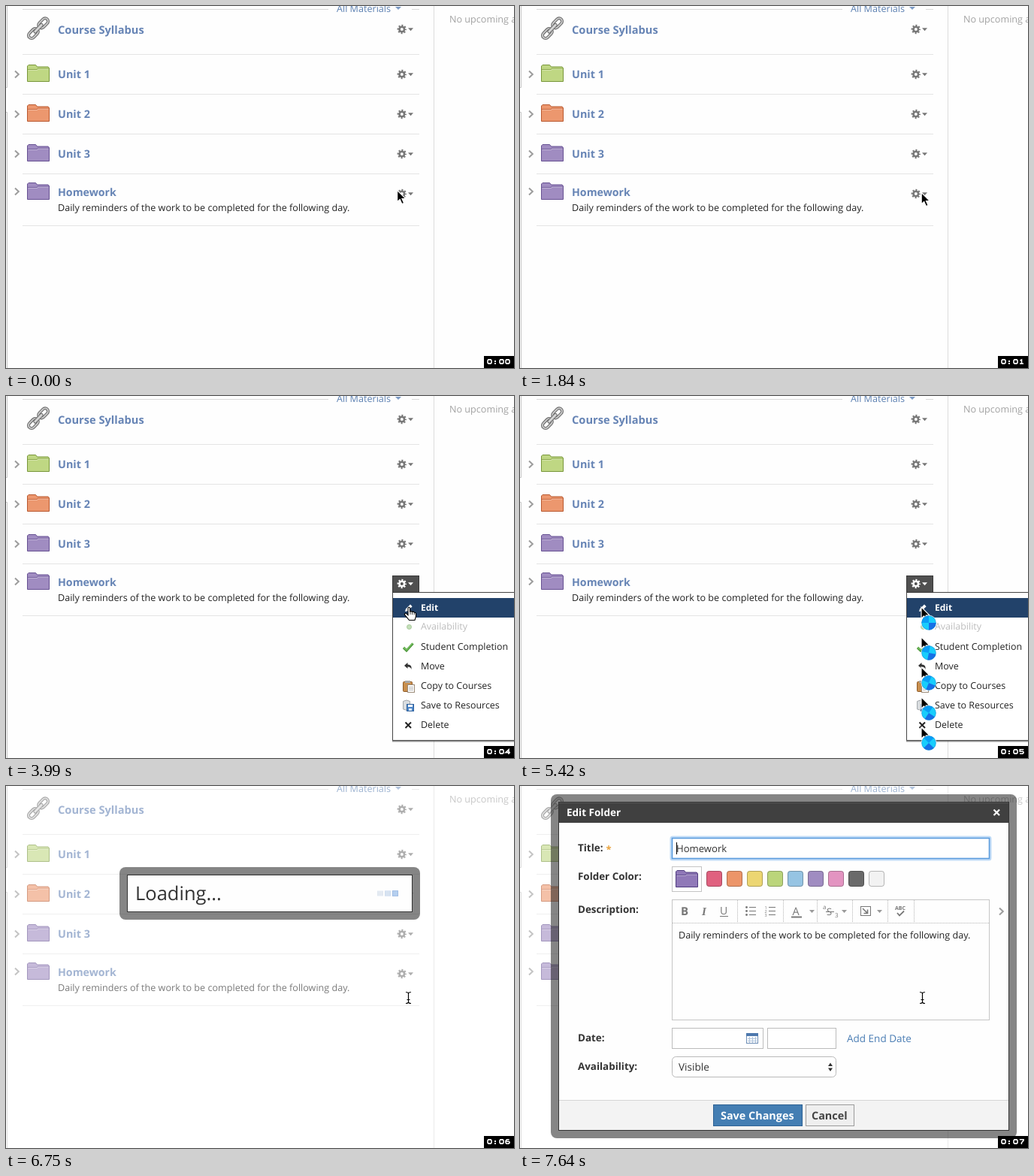
These frames come from a looping animation (676x482 px, 8 s). An HTML page:

```html
<!DOCTYPE html>
<html lang="en">
<head>
<meta charset="utf-8">
<title>Edit folder</title>
<style>
html, body { margin: 0; width: 100%; height: 100%; overflow: hidden; background: #fefefe; }
svg { display: block; }
text { font-family: "Open Sans", "Noto Sans", sans-serif; text-rendering: geometricPrecision; white-space: pre; }
</style>
</head>
<body>
<svg id="stage" width="676" height="482" viewBox="0 0 676 482"></svg>
<script>
const LOOP = 8000;
const range = n => [...Array(n).keys()];

// ---------- shape helpers ----------
const text = (x, y, s, size = 12.6, fill = '#222', extra = '') =>
  `<text x="${x}" y="${y}" font-size="${size}" fill="${fill}" ${extra}>${s}</text>`;
const bold = (x, y, s, size, fill) => text(x, y, s, size, fill, 'font-weight="700"');
const rect = (x, y, w, h, fill, extra = '') =>
  `<rect x="${x}" y="${y}" width="${w}" height="${h}" fill="${fill}" ${extra}/>`;
const box = (x, y, w, h, fill, stroke, rx = 0) =>
  rect(x + .5, y + .5, w - 1, h - 1, fill, `stroke="${stroke}" rx="${rx}"`);
const path = (d, fill, extra = '') => `<path d="${d}" fill="${fill}" ${extra}/>`;
const line = (d, stroke, width = 1, extra = '') =>
  path(d, 'none', `stroke="${stroke}" stroke-width="${width}" ${extra}`);
const group = (s, extra = '') => `<g ${extra}>${s}</g>`;
const at = (x, y, s, extra = '') => group(s, `transform="translate(${x} ${y})" ${extra}`);

const caret = (x, y, fill, w = 7) => path(`M${x} ${y}h${w}l${-w / 2} 4z`, fill);
const chevron = (x, y) => line(`M${x} ${y - 4.5}l4.8 4.5l-4.8 4.5`, '#9c9c9c', 2);
const gear = (y, c = '#777') => at(526.8, y,
  `<circle r="3.3" fill="none" stroke="${c}" stroke-width="2.6"/>` +
  `<circle r="5.1" fill="none" stroke="${c}" stroke-width="2.2" stroke-dasharray="2 2.005" stroke-dashoffset="1"/>`) +
  caret(535, y - 1.8, c);
const folder = (x, y, fill, edge) => at(x, y,
  path('M.5 22.5V2L2 .5H11.5L13.5 3H28L29.5 4.5V22.5Z', fill, `stroke="${edge}"`) +
  line('M1 6.5H13L14.5 5.2H29', edge, 1, 'opacity=".7"') +
  line('M1.5 7.5H13.5L15 6.2H28.5', '#fff', 1, 'opacity=".35"'));

const GREEN = ['#bfd783', '#78963a'], ORANGE = ['#ec976e', '#b9582f'], PURPLE = ['#a08cc1', '#665192'];
const LINK = '#6684b5';

// ---------- course page ----------
const chain = at(43, 29.7, group(
  [-9.5, 9.5].map(x =>
    rect(x - 7.5, -4, 15, 8, 'none', 'rx="4" stroke="#6f6f6f" stroke-width="4"') +
    rect(x - 7.5, -4, 15, 8, 'none', 'rx="4" stroke="#cfcfcf" stroke-width="1.7"')).join('') +
  rect(-8, -2, 16, 4, '#d4d4d4', 'rx="2" stroke="#666"'), 'transform="rotate(-46)"'));

const page =
  rect(0, 0, 676, 482, '#fefefe') +
  line('M0 108.5H1.5V0M0 141.5H1.5V482', '#c6c6c6') +
  line('M569.5 0V482', '#dcdcdc') +
  line('M22 4.5H429M540 4.5H550', '#d9d9d9') +
  line([64, 117, 170, 223, 292].map(y => `M22 ${y}.5H550`).join(''), '#e4e4e4') +
  text(440, 8, 'All Materials', 12.6, '#5c80b2') + caret(518, 1, '#7c9bc6', 8) +
  text(590, 22, 'No upcoming a', 12.6, '#a3a3a3') +
  chain + bold(69, 37, 'Course Syllabus', 14.65, LINK) +
  [['Unit 1', 91, GREEN], ['Unit 2', 144, ORANGE], ['Unit 3', 197, PURPLE]].map(([s, y, c]) =>
    chevron(12, y) + folder(28, y - 13, ...c) + bold(69, y + 5, s, 14.4, LINK)).join('') +
  chevron(12, 247) + folder(28, 235, ...PURPLE) + bold(69, 253, 'Homework', 14.2, LINK) +
  text(69, 273, 'Daily reminders of the work to be completed for the following day.') +
  [31, 91, 144, 197, 250].map(y => gear(y)).join('');

// ---------- gear menu ----------
const hover = box(514, 239, 36, 23, '#f3f3f3', '#bdbdbd') + gear(250, '#666');

const pencil = c => path('M531 287l1-3.4 6-6 2.6 2.6-6 6z', c);
const disk = at(528, 404,
  path('M.5 2.5Q5 -.5 9.5 2.5V13Q5 15.5 .5 13Z', '#d9dde0', 'stroke="#a4a9ad"') +
  box(5, 6, 10, 10, '#4c86c8', '#2f619c') + rect(7, 7, 6, 3, '#fff') + rect(8, 12, 4, 3, '#dbe8f6'));
const clipboard = at(528, 379,
  box(0, 1, 13, 14, '#c98f4e', '#8e5a26', 1) + rect(3, 0, 7, 3, '#a9a9a9') +
  box(6, 5, 10, 11, '#fff', '#9a8a78') + line('M8 8.5H14M8 10.5H14M8 12.5H14', '#b9b9b9'));
const items = [['Edit', 286], ['Availability', 311, '#bdbdbd'], ['Student Completion', 338],
  ['Move', 364], ['Copy to Courses', 390], ['Save to Resources', 416], ['Delete', 442]];

const menu =
  rect(514, 459, 162, 2, '#000', 'opacity=".22"') +
  rect(514.5, 261.5, 170, 197, '#fff', 'stroke="#444"') + rect(514, 458, 162, 1.5, '#555') +
  box(514, 239, 36, 23, '#505050', '#383838') + gear(250, '#fff') +
  items.map(([s, y, c]) => text(552, y, s, 12.45, c)).join('') + pencil('#222') +
  '<circle cx="536.5" cy="307.5" r="3" fill="#c3dfb8" stroke="#a8c99c"/>' +
  line('M529 335l4 4 8.5-9.5', '#4f9a3d', 3.2) + line('M529.5 335l3.6 3.2 8-9', '#7cc565', 1.2) +
  path('M530 359l4.5-4v2.6q6 0 5 6.6q-1-3.6-5-3.6v2.4z', '#333') +
  clipboard + disk + line('M531.5 434.5l7.5 7.5M539 434.5l-7.5 7.5', '#222', 2);
const editRow = rect(515, 269, 161, 26, '#22426a') + bold(552, 286, 'Edit', 12, '#fff') + pencil('#fff');

// ---------- loading box ----------
const frame = (x, y, w, h) =>
  rect(x, y, w, h, '#000', 'rx="8" opacity=".48"') + box(x + 10, y + 10, w - 20, h - 20, '#fefefe', '#333');
const loading = frame(151, 108, 400, 70) + text(172, 152, 'Loading...', 25.5, '#333') +
  range(3).map(i => rect(494 + 10 * i, 140, 8, 6, '#eceff3') +
    box(494 + 10 * i, 139, 8, 8, '#93bbee', '#6f9cda').replace('<rect', `<rect id="cell${i}"`)).join('');

// ---------- edit dialog ----------
const label = (y, s) => bold(77, y, s, 13.4, '#333');
const swatches = ['#e0617f', '#ec9569', '#ecd672', '#bbd57b', '#96c4e3', '#a08cc1', '#e394c1', '#6a6a6a', '#f2f2f2'];
const INK = '#777';
const tools =
  bold(214, 172, 'B', 15, INK) +
  text(242, 172, 'I', 15, INK, 'font-style="italic" style="font-family:\'Liberation Serif\',serif" font-weight="700"') +
  text(266, 171, 'U', 14, INK) + line('M266 173.5H277', INK) +
  line('M305 161.5H314M305 166.5H314M305 171.5H314', INK) +
  [161.5, 166.5, 171.5].map((y, i) => `<circle cx="301.5" cy="${y}" r="1.4" fill="${INK}"/>` +
    text(325.5, y + 2, i + 1, 5.5, INK)).join('') +
  line('M331 161.5H340M331 166.5H340M331 171.5H340', INK) +
  text(362.5, 172, 'A', 14.5, INK) + line('M361 174.5H375', INK, 2) +
  text(403, 164, 'a', 8, INK) + text(408, 172, 'S', 13, INK) + line('M407 167.5H418', INK) + text(419, 175, '3', 8, INK) +
  box(453, 160, 14, 13, 'none', INK) + line('M456 163l6 6M462.5 164.5V169.5H457.5', INK, 1.6) +
  [385, 428, 475].map(x => caret(x, 165, '#999')).join('') +
  bold(499, 165, 'ABC', 7, INK) + line('M502 169l3 3.5 6-6', INK, 1.8);

const dialog = frame(41, 11, 620, 458) +
  rect(52, 22, 598, 27, '#404040') + rect(52, 22, 598, 1, '#565656') +
  bold(62, 40, 'Edit Folder', 13.5, '#fff') + line('M630.5 31.5l7.5 7.5M638 31.5l-7.5 7.5', '#fff', 2.2) +
  label(87, 'Title:') + bold(114.5, 89, '*', 13, '#e9a23b') +
  rect(201, 68, 425, 30, 'none', 'stroke="#a9cff5" stroke-width="3" rx="2" opacity=".7"') +
  rect(202.5, 69.5, 422, 27, '#fff', 'stroke="#5b9cdd" stroke-width="1.6"') +
  text(208, 88, 'Homework', 13.1, '#333') +
  rect(208, 75, 1, 16, '#000', 'id="caret"') +
  label(125, 'Folder Color:') + box(202, 107, 40, 34, '#fff', '#c4c4c4') + folder(207, 112, '#9079b8', '#513d80') +
  swatches.map((c, i) => box(248 + 27 * i, 113, 21, 21, c, c, 3) +
    rect(248.5 + 27 * i, 113.5, 20, 20, 'none', 'rx="3" stroke="#000" stroke-opacity=".25"')).join('') +
  label(169, 'Description:') + box(202, 151, 423, 161, '#fefefe', '#c6c6c6') +
  line('M203 182.5H624' + [289, 350, 395, 442, 489, 524].map(x => `M${x}.5 152V182`).join(''),
    '#b5b5b5', 1, 'stroke-dasharray="1 1"') + tools +
  chevron(638, 167) +
  text(211, 203, 'Daily reminders of the work to be completed for the following day.') +
  label(340, 'Date:') + box(202, 322, 122, 28, '#fff', '#bcbcbc') + box(329, 322, 92, 28, '#fff', '#bcbcbc') +
  box(301, 329, 16, 14, '#fff', '#6d8db5') + rect(301, 329, 16, 4, '#4d78ad') +
  line('M303 336.5H315M303 339.5H315M305.5 334V342M309.5 334V342M313.5 334V342', '#aec3db') +
  text(435, 341, 'Add End Date', 13.5, '#4a7db4') +
  label(378, 'Availability:') + box(202, 360, 219, 28, '#fefefe', '#b9b9b9', 5) + text(211, 379, 'Visible', 13.6, '#333') +
  path('M410 373l3-4.5 3 4.5zM410 375.5l3 4.5 3-4.5z', '#333') +
  rect(52, 418, 598, 40, '#f3f3f3') + line('M52 418.5H650', '#d5d5d5') +
  box(257, 424, 119, 29, '#447eb3', '#2d6194') + bold(267, 444, 'Save Changes', 14.4, '#fff') +
  box(380, 424, 65, 29, '#efefef', '#9b9b9b') + bold(388, 444, 'Cancel', 14.4, '#444');

// ---------- cursors ----------
const arrow = path('M0 0V15.2L3.5 12 6.2 18 8.8 16.9 6.2 11H11Z', '#000', 'stroke="#fff" stroke-width="1.1"');
const hand = path('M0 1.2Q1.3-.8 2.6 1.2V6Q4.4 5 5.4 6.4Q7.2 5.6 8.2 7.2Q10.4 7 10.5 9V12.5L9 17.5H1.5L-4.5 10.2Q-4.8 8 -2.6 8.4L0 10.8Z',
  '#fff', 'stroke="#000" stroke-width="1.1"') + line('M3 6V10M5.6 7V10.2M8.2 8V10.4', '#000', .8);
const ibeam = d => line('M-3 -7.5Q0 -7.5 .5 -6Q1 -7.5 4 -7.5M.5 -6.5V6.5M-3 7.5Q0 7.5 .5 6Q1 7.5 4 7.5M-1.5 2.5H2.5', ...d);
const ball = turn =>
  '<circle r="10.3" fill="#fff"/><circle r="9.6" fill="#18cdfc"/>' +
  group(path('M0 0H-9.6A9.6 9.6 0 0 1 0 -9.6Z', '#0a9df6') + path('M0 0H9.6A9.6 9.6 0 0 1 0 9.6Z', '#1670e6'),
    `transform="rotate(${turn})"`) +
  '<circle r="9.4" fill="none" stroke="#1672c4" stroke-opacity=".5" stroke-width=".8"/>';
const waiting = range(5).map(i => at(534, 281 + 40 * i, arrow) + at(544, 302 + 40 * i, ball(11.25 * i))).join('');

// ---------- clock ----------
const digits = [
  'M2 .9H5L6 2V5L5 6.1H2L1 5V2Z', 'M1.5 2L3.5 1V6M1 6.2H6', 'M1 2L2 .9H5L6 2V3L1.6 6.1H6.5',
  'M1 1.4L2 .9H5L6 2L5 3.5H3M5 3.5L6 5L5 6.1H2L1 5.5', 'M5 7V.9L1 4.6H7', 'M6.3 .8H1.2V3.2H5L6 4.2V5L5 6.2H1',
  'M5.6 .8H2.5L1 2.5V5L2 6.2H5L6 5V4.2L5 3.2H1', 'M.8 .8H6V2L3.4 5V7'];
const digit = (x, n, id = '') => at(x, 470, line(digits[n], '#fff', 1.6, id));
const clock = rect(636, 466, 40, 16, '#000') + digit(640, 0) + rect(650, 472, 2, 2, '#fff') +
  rect(650, 475, 2, 2, '#fff') + digit(656, 0) + digit(664, 0, 'id="second"');

const layer = (id, s) => group(s, `id="${id}"`);
document.getElementById('stage').innerHTML =
  page + layer('hover', hover) + layer('menu', menu) + layer('editRow', editRow) +
  layer('fade', rect(0, 0, 676, 482, '#fff', 'opacity=".4"')) +
  layer('loading', loading) + layer('dialog', dialog) +
  layer('arrow', arrow) + layer('hand', hand) + layer('waiting', waiting) +
  layer('ibeam', at(535, 282, ibeam(['#fff', 3]) + ibeam(['#000', 1.2]))) + clock;

// ---------- timeline ----------
const T = { hover: 2250, open: 2840, wait: 5420, load: 5700, spin: 5890, text: 6170, dialog: 6810 };
const seconds = [960, 1950, 3000, 3990, 5010, 6000, 7040];
const $ = id => document.getElementById(id);
const show = (id, on) => { $(id).style.display = on ? '' : 'none'; };
const ease = (t, a, b) => {
  const p = Math.min(1, Math.max(0, (t - a) / (b - a)));
  return p * p * (3 - 2 * p);
};
const place = (id, x, y) => $(id).setAttribute('transform', `translate(${x.toFixed(2)} ${y.toFixed(2)})`);

function draw(t) {
  const move = ease(t, 1100, 1360), settle = ease(t, 1850, 1960), down = ease(t, 3620, 3990);
  const handY = 250 + 31 * down;

  show('hover', t >= T.hover && t < T.open);
  show('menu', t >= T.open && t < T.load);
  show('editRow', handY >= 269 && t < T.load);
  show('fade', t >= T.load);
  show('loading', t >= T.load && t < T.dialog);
  show('dialog', t >= T.dialog);
  show('caret', t < 7160 || t >= 7640);

  show('arrow', t < T.hover);
  show('hand', t >= T.hover && t < T.wait);
  show('waiting', t >= T.wait && t < T.text);
  show('ibeam', t >= T.text);
  place('arrow', 520.7 + 13.5 * move, 245.5 + 3 * move + 1.5 * settle);
  place('hand', 533.5 + 1.5 * down, handY);

  // the loader stalls for a moment before the dialog opens
  const spin = t >= 6750 ? 5.5 : Math.floor((Math.min(t, 6390) - T.spin) / 55) / 2;
  for (const i of range(3)) {
    const age = spin - i;
    $('cell' + i).setAttribute('opacity', age < 0 ? 0 : Math.exp(-(age % 3)).toFixed(3));
  }
  $('second').setAttribute('d', digits[seconds.filter(s => t >= s).length]);
}

function tick() {
  draw(performance.now() % LOOP);
  requestAnimationFrame(tick);
}
tick();
</script>
</body>
</html>
```
